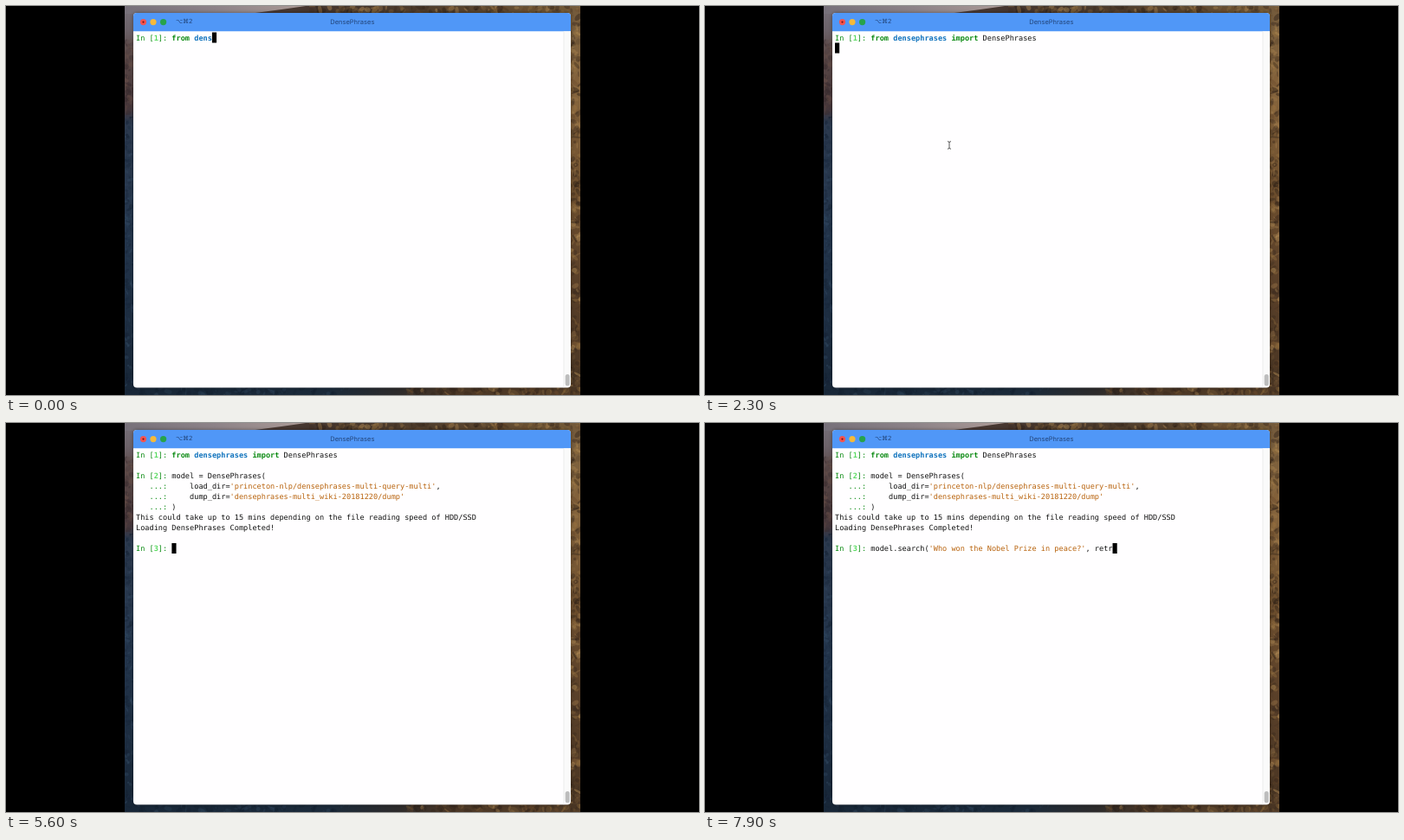
An HTML page with a canvas that plays this animation: 800 by 450 pixels, repeating every 8000 ms.

```html
<!DOCTYPE html>
<html lang="en">
<head>
<meta charset="utf-8">
<title>Terminal session</title>
<style>
  html, body { margin: 0; width: 100%; height: 100%; overflow: hidden; background: #000; }
  canvas { display: block; width: 800px; height: 450px; }
</style>
</head>
<body>
<canvas id="stage" width="800" height="450"></canvas>
<script>
const W = 800, H = 450, LOOP = 8000, STEP = 100;
const COL = 5.17, ROW = 12.05, LEFT = 150, TOP = 30.5;
const MONO = '8.59px "DejaVu Sans Mono", monospace';
const BLACK = '#111', GREEN = '#0b8a12', LIME = '#5bdc62', BLUE = '#0f72bd', ORANGE = '#b8620c';

const ctx = document.getElementById('stage').getContext('2d');
const backdrop = document.createElement('canvas');
backdrop.width = W;
backdrop.height = H;

// Typed text: [time, characters shown]
const importKeys = [[0, 9], [1400, 30], [1900, 37]];
const searchKeys = [[5800, 0], [6500, 11], [7900, 54]];
const ENTER = 2200, READY = 2900, PASTE = 4000, RUN = 4400, LOADED = 5300;

const importLine = [['from', GREEN, true], [' '], ['densephrases', BLUE, true], [' '],
  ['import', GREEN, true], [' DensePhrases']];
const modelLines = [
  [['model = DensePhrases(']],
  [['    load_dir='], ["'princeton-nlp/densephrases-multi-query-multi'", ORANGE], [',']],
  [['    dump_dir='], ["'densephrases-multi_wiki-20181220/dump'", ORANGE]],
  [[')']]
];
const searchLine = [['model.search('], ["'Who won the Nobel Prize in peace?'", ORANGE], [', retr']];

function random(seed) {
  return () => (seed = (seed * 16807) % 2147483647) / 2147483647;
}

function along(keys, t) {
  if (t <= keys[0][0]) return keys[0][1];
  for (let i = 1; i < keys.length; i++) {
    const [t0, a] = keys[i - 1], [t1, b] = keys[i];
    if (t <= t1) return a + (b - a) * (t - t0) / (t1 - t0);
  }
  return keys[keys.length - 1][1];
}

function gradient(g, x0, y0, x1, y1, stops) {
  const fill = g.createLinearGradient(x0, y0, x1, y1);
  stops.forEach(([at, color]) => fill.addColorStop(at, color));
  return fill;
}

function speckle(g, seed, count, [x, y, w, h], colors, size) {
  const rnd = random(seed);
  g.save();
  g.beginPath();
  g.rect(x, y, w, h);
  g.clip();
  for (let i = 0; i < count; i++) {
    g.globalAlpha = 0.15 + rnd() * 0.35;
    g.fillStyle = colors[Math.floor(rnd() * colors.length)];
    g.beginPath();
    g.ellipse(x + rnd() * w, y + rnd() * h, 1 + rnd() * size, 0.6 + rnd() * size * 0.6,
      rnd() * 3, 0, Math.PI * 2);
    g.fill();
  }
  g.restore();
}

function paintWallpaper(g) {
  const rock = ['#2a1d15', '#b08a55', '#6b4a2c', '#3a2a1e', '#94703f'];
  g.fillStyle = gradient(g, 0, 0, 0, H, [[0, '#77717a'], [0.06, '#6d636a'], [0.12, '#5c4a48'],
    [0.26, '#46363a'], [0.3, '#2c3a4f'], [0.6, '#22344b'], [1, '#182738']]);
  g.fillRect(137, 0, 12, H);
  speckle(g, 11, 60, [137, 38, 10, 88], ['#33272a', '#6b5047', '#4a3a3c'], 4);
  speckle(g, 23, 170, [137, 128, 10, 322], ['#152234', '#334a63', '#1c2c40'], 3);

  g.fillStyle = gradient(g, 137, 0, 345, 0, [[0, '#77717a'], [0.5, '#8d8388'], [1, '#ab9a96']]);
  g.fillRect(137, 0, 526, 9);
  g.fillStyle = gradient(g, 285, 0, 663, 0, [[0, '#4a3a36'], [0.3, '#43342a'], [0.7, '#5a452e'], [1, '#765c38']]);
  g.beginPath();
  g.moveTo(280, 9);
  g.lineTo(318, 4);
  g.lineTo(346, 0);
  g.lineTo(663, 0);
  g.lineTo(663, 9);
  g.fill();
  speckle(g, 37, 130, [350, 0, 313, 9], rock, 5);

  g.fillStyle = gradient(g, 0, 0, 0, H, [[0, '#735a3b'], [0.2, '#87663e'], [0.45, '#70512f'],
    [0.7, '#5a4029'], [1, '#493523']]);
  g.fillRect(651, 0, 12, H);
  speckle(g, 53, 270, [651, 0, 12, H], rock, 5);

  g.fillStyle = gradient(g, 137, 0, 663, 0, [[0, '#182738'], [0.45, '#1b2a3a'], [0.6, '#2d2b2b'],
    [0.72, '#4b3726'], [1, '#523c27']]);
  g.fillRect(137, 440, 526, 10);
  speckle(g, 71, 90, [137, 441, 260, 9], ['#13202f', '#2d4258'], 4);
  speckle(g, 89, 90, [460, 441, 203, 9], rock, 5);
}

function dot(g, x, y, r, color) {
  g.fillStyle = color;
  g.beginPath();
  g.arc(x, y, r, 0, Math.PI * 2);
  g.fill();
}

function paintWindow(g) {
  g.save();
  g.shadowColor = 'rgba(0,0,0,.4)';
  g.shadowBlur = 4;
  g.fillStyle = '#fffeff';
  g.beginPath();
  g.roundRect(147, 8, 505, 433.5, 4);
  g.fill();
  g.restore();

  g.fillStyle = '#5097f7';
  g.beginPath();
  g.roundRect(147, 8, 505, 21.3, [4, 4, 0, 0]);
  g.fill();
  dot(g, 158.5, 18.6, 3.6, '#f4544f');
  dot(g, 158.5, 18.6, 1.1, '#7a1512');
  dot(g, 170, 18.6, 3.6, '#f6b93a');
  dot(g, 181.6, 18.6, 3.6, '#27a34b');

  g.fillStyle = '#23467c';
  g.textBaseline = 'middle';
  g.textAlign = 'left';
  g.font = '7px "DejaVu Sans", sans-serif';
  g.fillText('⌥⌘2', 196, 18.5);
  g.textAlign = 'center';
  g.font = '7.5px Inter, sans-serif';
  g.fillText('DensePhrases', 399.8, 18.5);

  g.fillStyle = '#fafafa';
  g.fillRect(644, 29.3, 8, 408);
  g.fillStyle = '#e9e9e9';
  g.fillRect(643.5, 29.3, 0.8, 412);
  g.fillStyle = '#bdbdbd';
  g.beginPath();
  g.roundRect(645.7, 426, 5, 13.5, 2.5);
  g.fill();
}

// Draws coloured runs on the character grid and returns the column after them.
function write(row, col, runs, limit = Infinity) {
  for (const [text, color = BLACK, bold] of runs) {
    ctx.font = (bold ? 'bold ' : '') + MONO;
    ctx.fillStyle = color;
    for (const ch of text) {
      if (limit-- < 1) return col;
      ctx.fillText(ch, LEFT + col * COL, TOP + row * ROW + 9.1);
      col++;
    }
  }
  return col;
}

function prompt(row, n) {
  return write(row, 0, [['In [', GREEN], [String(n), LIME, true], [']: ', GREEN]]);
}

function cursor(row, col) {
  ctx.fillStyle = '#000';
  ctx.fillRect(LEFT + col * COL, TOP + row * ROW, COL, ROW);
}

function pointer(x, y) {
  ctx.strokeStyle = '#444';
  ctx.lineWidth = 0.9;
  ctx.beginPath();
  ctx.moveTo(x, y - 3.6);
  ctx.lineTo(x, y + 3.6);
  for (const s of [-1, 1]) {
    ctx.moveTo(x - 2, y + s * 4.3);
    ctx.quadraticCurveTo(x, y + s * 4.3, x, y + s * 3.2);
    ctx.quadraticCurveTo(x, y + s * 4.3, x + 2, y + s * 4.3);
  }
  ctx.stroke();
}

function terminal(t) {
  let row = 0;
  let col = write(0, prompt(0, 1), importLine, Math.floor(along(importKeys, t)));
  if (t >= ENTER) [row, col] = [1, 0];
  if (t >= READY) [row, col] = [2, prompt(2, 2)];
  if (t >= PASTE) {
    modelLines.forEach((line, i) => {
      row = 2 + i;
      col = write(row, i ? write(row, 0, [['   ...: ', GREEN]]) : 8, line);
    });
  }
  if (t >= RUN) {
    write(6, 0, [['This could take up to 15 mins depending on the file reading speed of HDD/SSD']]);
    [row, col] = [7, 0];
  }
  if (t >= LOADED) {
    write(7, 0, [['Loading DensePhrases Completed!']]);
    row = 9;
    col = write(9, prompt(9, 3), searchLine, Math.floor(along(searchKeys, t) + 1e-6));
  }
  cursor(row, col);
  if (t >= ENTER && t < PASTE) {
    pointer(along([[2300, 282], [3500, 281]], t), along([[2300, 161], [3500, 167]], t));
  }
}

function frame(now) {
  const t = Math.floor((now % LOOP) / STEP) * STEP;
  ctx.fillStyle = '#000';
  ctx.fillRect(0, 0, W, H);
  ctx.drawImage(backdrop, 0, 0);
  ctx.textAlign = 'left';
  ctx.textBaseline = 'alphabetic';
  ctx.textRendering = 'geometricPrecision';
  terminal(t);
  requestAnimationFrame(frame);
}

const back = backdrop.getContext('2d');
back.textRendering = 'geometricPrecision';
back.fillStyle = '#000';
back.fillRect(0, 0, W, H);
paintWallpaper(back);
paintWindow(back);
back.fillStyle = '#000';
back.fillRect(0, 0, 137, H);
back.fillRect(663, 0, 137, H);
requestAnimationFrame(frame);
</script>
</body>
</html>
```
